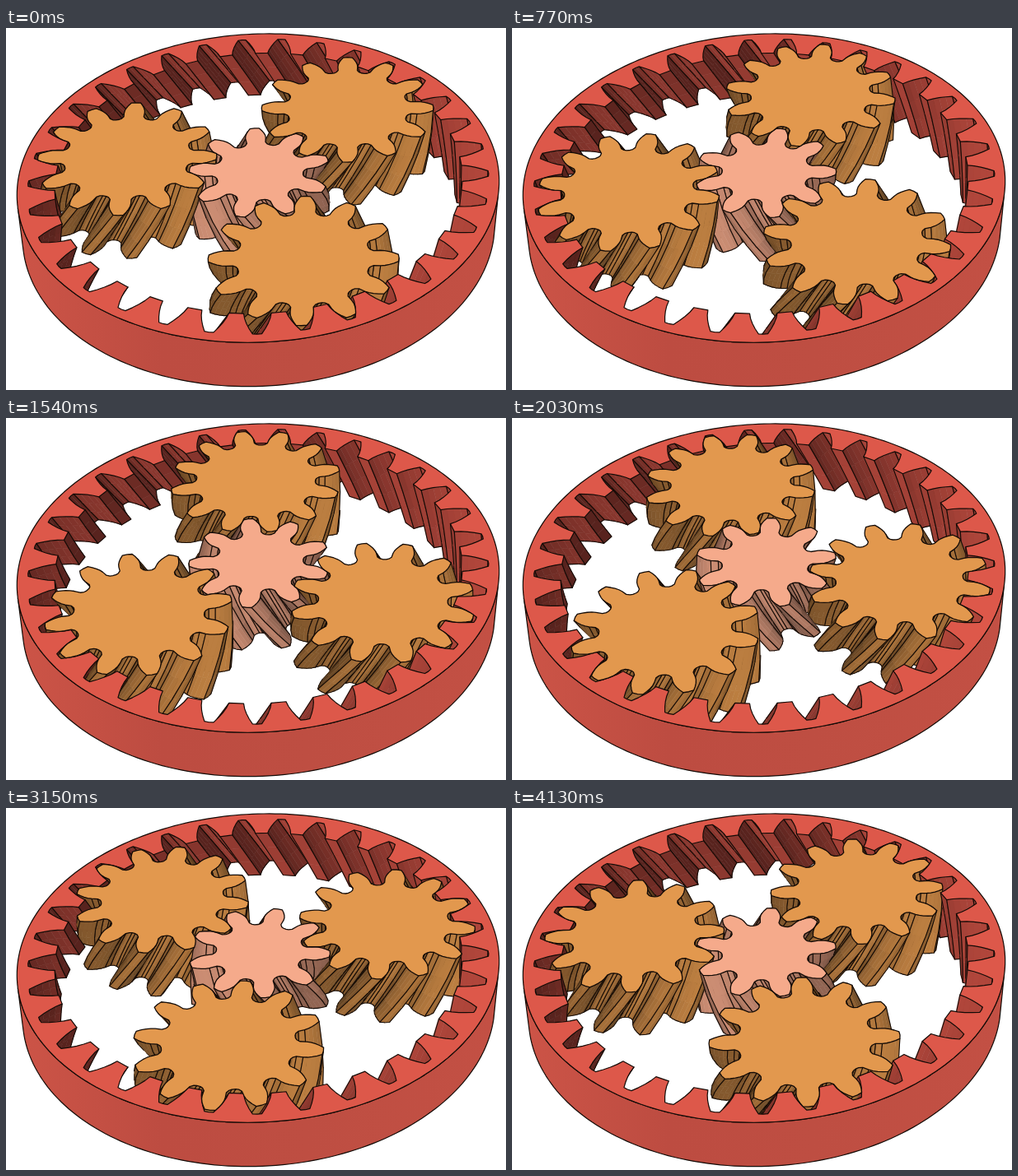
An HTML page with a canvas that plays this animation: 607x440 px, repeating every 4.2 s.

```html
<!DOCTYPE html>
<html lang="en">
<head>
<meta charset="utf-8">
<title>Planetary gear</title>
<style>
html, body { margin: 0; width: 100%; height: 100%; overflow: hidden; background: #fff; }
canvas { display: block; width: 607px; height: 440px; }
</style>
</head>
<body>
<canvas id="stage" width="607" height="440"></canvas>
<script>
const ctx = document.getElementById('stage').getContext('2d');
const RAD = Math.PI / 180;
const MODULE = 15.8, HEIGHT = 69, RIM = 291, SLICES = 3;
const ORBIT = 10.5 * MODULE, SLANT = 39;
const STEP_MS = 70, STEPS = 60;
const DIST = 2100, TILT = 0.69, YAW = 0.055, SKEW_X = 0.012, SKEW_Y = 0.033;
const sinT = Math.sin(TILT), cosT = Math.cos(TILT);
const LINE = '#120a06';

// x to the right, y away from the viewer, z up; top faces lie at z = 0
function project([x, y, z]) {
  const s = DIST / (DIST + x * YAW + y * cosT - z * sinT);
  const u = x * s, v = (y * sinT + z * cosT) * s;
  return [308 + u - v * SKEW_X, 174.5 - u * SKEW_Y - v];
}

const involute = c => Math.sqrt(1 / (c * c) - 1) - Math.acos(c);

// Outline of an involute gear; radii in modules, hard marks a visible edge
function profile(teeth, tip, root) {
  const half = Math.PI / teeth, base = teeth / 2 * Math.cos(20 * RAD);
  const low = Math.max(base, root);
  const width = r => half / 2 + involute(Math.cos(20 * RAD)) - involute(Math.min(1, base / r));
  const side = [];
  for (let i = 0; i <= 4; i++) {
    const r = tip + (low - tip) * i / 4;
    side.push({ r, a: width(r), hard: i === 0 || i === 4 });
  }
  if (root < base) {
    const w = width(base), gap = half - w;
    side.push({ r: root + 0.3, a: w + gap * 0.08, hard: true },
              { r: root + 0.08, a: w + gap * 0.4 },
              { r: root, a: w + gap * 0.75, hard: true });
  }
  const tooth = [
    ...side.slice().reverse().map(p => ({ ...p, a: -p.a })),
    { r: tip + 0.03, a: 0 },
    ...side
  ];
  const outline = [];
  for (let k = 0; k < teeth; k++)
    for (const p of tooth)
      outline.push({ r: p.r * MODULE, a: p.a + 2 * half * k, hard: p.hard });
  return outline;
}

function body(teeth, tip, root, twistSign, color, light, ambient, diffuse) {
  return {
    outline: profile(teeth, tip, root),
    twist: twistSign * SLANT / (teeth / 2 * MODULE),
    color, light, ambient, diffuse
  };
}

const sun = body(9, 5.4, 3.35, 1, [245, 170, 139], [0, -0.8, 0.5], 0.36, 0.5);
const planet = body(12, 6.9, 4.85, -1, [226, 152, 78], [0, -0.8, 0.5], 0.36, 0.5);
const ring = body(33, 17.6, 15.6, -1, [221, 88, 74], [-0.45, -0.7, 0.45], 0.4, 0.42);
ring.outline.reverse();

const rgb = (c, k = 1) => `rgb(${c.map(v => Math.round(v * k)).join()})`;

function layer(part, angle, cx, cy, t) {
  return part.outline.map(p => {
    const a = p.a + angle + part.twist * t;
    return [cx + p.r * Math.cos(a), cy + p.r * Math.sin(a), -HEIGHT * t];
  });
}

function shade(part, a, b, c) {
  const p = [0, 1, 2].map(i => c[i] - a[i]), q = [0, 1, 2].map(i => b[i] - a[i]);
  const n = [p[1] * q[2] - p[2] * q[1], p[2] * q[0] - p[0] * q[2], p[0] * q[1] - p[1] * q[0]];
  const dot = n.reduce((sum, v, i) => sum + v * part.light[i], 0) / (Math.hypot(...n) || 1);
  return rgb(part.color, part.ambient + part.diffuse * Math.max(0, dot));
}

const facing = (a, b, c) => (b[0] - a[0]) * (c[1] - a[1]) - (b[1] - a[1]) * (c[0] - a[0]) > 0;

// Collects the visible side faces and returns the projected top outline
function addWalls(faces, part, angle, cx = 0, cy = 0) {
  const n = part.outline.length;
  let upper = layer(part, angle, cx, cy, 0);
  let flatUp = upper.map(project);
  const top = flatUp;
  for (let s = 1; s <= SLICES; s++) {
    const lower = layer(part, angle, cx, cy, s / SLICES);
    const flatLow = lower.map(project);
    const seen = upper.map((_, i) => facing(flatUp[i], flatUp[(i + 1) % n], flatLow[i]));
    for (let i = 0; i < n; i++) {
      if (!seen[i]) continue;
      const j = (i + 1) % n;
      const y = upper[i][1] + upper[j][1] + lower[i][1] + lower[j][1];
      faces.push({
        depth: y / 4 * cosT - (upper[i][2] + lower[i][2]) / 2 * sinT,
        quad: [flatUp[i], flatUp[j], flatLow[j], flatLow[i]],
        fill: shade(part, upper[i], upper[j], lower[i]),
        first: part.outline[i].hard || !seen[(i + n - 1) % n],
        last: part.outline[j].hard || !seen[j],
        foot: s === SLICES
      });
    }
    upper = lower;
    flatUp = flatLow;
  }
  return top;
}

function trace(points, close = true) {
  points.forEach((p, i) => i ? ctx.lineTo(...p) : ctx.moveTo(...p));
  if (close) ctx.closePath();
}

function stroke(color, width) {
  ctx.strokeStyle = color;
  ctx.lineWidth = width;
  ctx.stroke();
}

function drawFace(f) {
  const [a, b, c, d] = f.quad;
  ctx.beginPath();
  trace(f.quad);
  ctx.fillStyle = f.fill;
  ctx.fill();
  stroke(f.fill, 0.6);
  ctx.beginPath();
  if (f.first) trace([a, d], false);
  if (f.last) trace([b, c], false);
  if (f.foot) trace([c, d], false);
  stroke(LINE, 1.1);
}

const circle = z => Array.from({ length: 240 }, (_, i) => {
  const a = (90 + i * 1.5) * RAD;
  return project([RIM * Math.cos(a), RIM * Math.sin(a), z]);
});
const rimTop = circle(0), rimFoot = circle(-HEIGHT);
const front = rimTop.map((_, i) => i).filter(i => facing(rimTop[i], rimTop[(i + 1) % 240], rimFoot[i]));
const rimWall = [...front.map(i => rimTop[i]), ...front.map(i => rimFoot[i]).reverse()];
const rimFill = ctx.createLinearGradient(14, 0, 600, 0);
[[0, '#cc5447'], [0.3, '#bd4c41'], [0.6, '#be4e42'], [1, '#c35044']]
  .forEach(stop => rimFill.addColorStop(...stop));

function drawTop(points, color) {
  ctx.beginPath();
  trace(points);
  ctx.fillStyle = rgb(color);
  ctx.fill();
  stroke(LINE, 1.3);
}

function draw(step) {
  const turn = 2 * step;
  const faces = [];
  const ringTop = addWalls(faces, ring, 269 * RAD);
  const sunTop = addWalls(faces, sun, (94 + turn * (1 + 33 / 9)) * RAD);
  const planetTops = [0, 120, 240].map(offset => {
    const a = (47.2 + offset + turn) * RAD;
    const spin = (27.2 + turn * (1 - 33 / 12)) * RAD;
    return addWalls(faces, planet, spin, ORBIT * Math.cos(a), ORBIT * Math.sin(a));
  });

  ctx.fillStyle = '#fff';
  ctx.fillRect(0, 0, 607, 440);
  ctx.lineJoin = ctx.lineCap = 'round';
  faces.sort((p, q) => q.depth - p.depth).forEach(drawFace);

  ctx.beginPath();
  trace(rimWall);
  ctx.fillStyle = rimFill;
  ctx.fill();
  stroke(LINE, 1.2);

  ctx.beginPath();
  trace(rimTop);
  trace(ringTop);
  ctx.fillStyle = rgb(ring.color);
  ctx.fill('evenodd');
  stroke(LINE, 1.2);

  drawTop(sunTop, sun.color);
  planetTops.forEach(top => drawTop(top, planet.color));
}

const start = performance.now();
let shown = -1;
function tick() {
  const step = Math.floor((performance.now() - start) / STEP_MS) % STEPS;
  if (step !== shown) draw(shown = step);
  requestAnimationFrame(tick);
}
tick();
</script>
</body>
</html>
```
